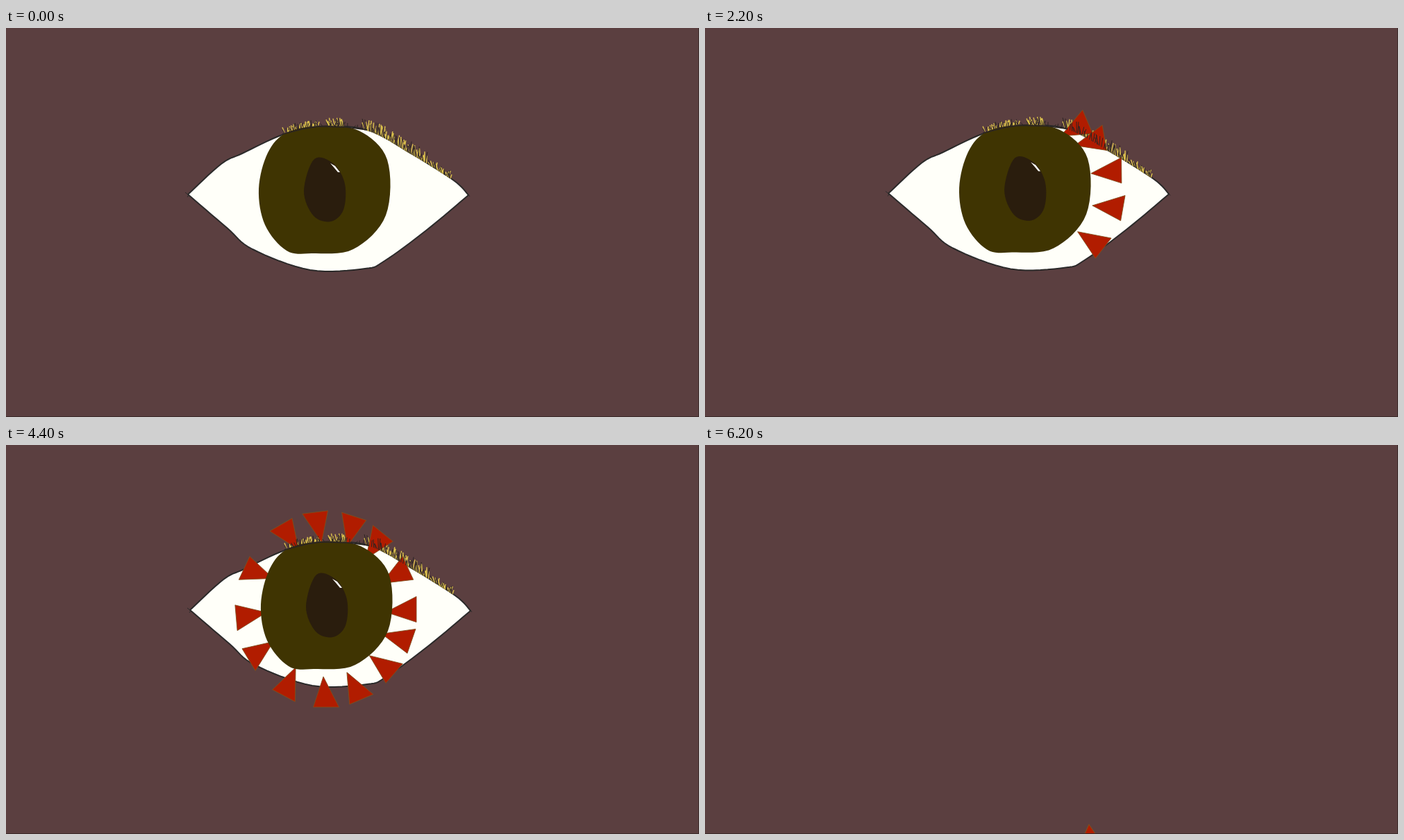
Animation of 998 by 561 pixels, one loop 6.4 s. Source, as an HTML page with a canvas:

```html
<!DOCTYPE html>
<html lang="en">
<head>
<meta charset="utf-8">
<title>Eye</title>
<style>
html, body { margin: 0; width: 100%; height: 100%; overflow: hidden; background: #5b3f40; }
canvas { display: block; }
</style>
</head>
<body>
<canvas id="stage" width="998" height="561"></canvas>
<script>
const ctx = document.getElementById('stage').getContext('2d');
const STEP = 200, COUNT = 32, RAD = Math.PI / 180;
const DARK = '#2b2422', RED = '#b11c00', WHITE = '#fffff9';

// Smooth curve through a few key points, as a dense list of points
function curve(text, closed) {
  const p = text.split(' ').map(s => s.split(',').map(Number));
  const len = p.length, last = closed ? len : len - 1, out = [];
  const get = i => closed ? p[(i + len) % len] : p[Math.max(0, Math.min(len - 1, i))];
  for (let i = 0; i < last; i++) {
    const [a, b, c, d] = [-1, 0, 1, 2].map(k => get(i + k));
    for (let u = 0; u < 1; u += 0.125) {
      out.push([0, 1].map(k => b[k] + u / 2 * (c[k] - a[k]
        + u * (2 * a[k] - 5 * b[k] + 4 * c[k] - d[k] + u * (3 * (b[k] - c[k]) + d[k] - a[k])))));
    }
  }
  if (!closed) out.push(p[len - 1]);
  return out;
}

const eyeTop = curve('262,240 310,196 340,181 398,154 450,142 520,147 585,182 645,220 666,241');
const eyeLow = curve('666,241 605,292 545,336 517,347 438,349 355,319 318,288 262,240');
const iris = curve('404,151 452,141.5 508,148 549,190 547,270 500,319 440,325 404,321 373,284 364,232 377,180', true);
const pupil = curve('444,189 472,196 488,225 486,262 468,279 443,271 429,235', true);
const lidTop = curve('248,251 305,193 375,154 440,132 510,133 605,182 687,250');
const lidLow = curve('687,252 600,330 510,381 438,383 335,335 309,309 248,251');

// Values of a track of [position, ...values] at n
function at(keys, n) {
  const j = keys.findIndex(k => k[0] > n);
  if (j === 0) return keys[0].slice(1);
  if (j < 0) return keys[keys.length - 1].slice(1);
  const a = keys[j - 1], b = keys[j], u = (n - a[0]) / (b[0] - a[0]);
  return a.slice(1).map((v, i) => v + (b[i + 1] - v) * u);
}

// Angles of the spikes round the iris: ten, then a full ring, then turned clockwise
const ten = [-51, -37, -14, 10, 38, 81, 113, 158, 197, 232];
const ring = [-46, -24, 0, 23, 52, 79, 111, 145, 197, 218, 248, 270, 290, 171];
const turned = [-25, 0, 19, 41, 67, 90, 118, 149, 205, 240, 263, 288, 309, 175];
const spikes = ring.map((a, i) => ({
  birth: i < 9 ? 7 + i : 6 + i,
  keys: [[15, ten[i] ?? a], [19, a], [22, turned[i]], [27, turned[i] + 12]]
}));
const drift = [[0, 0, 0], [7, 2.4, -2], [15, 1.8, -1], [19, 1, -1], [22, 3, -2]];

function random(seed) {
  return () => (seed = (seed * 16807) % 2147483647) / 2147483647;
}

function poly(list, fill, stroke, width) {
  ctx.beginPath();
  list.forEach(p => ctx.lineTo(...p));
  ctx.closePath();
  ctx.fillStyle = fill;
  ctx.fill();
  if (stroke) pen(stroke, width);
}

function pen(color, width, path = undefined) {
  ctx.strokeStyle = color;
  ctx.lineWidth = width;
  if (path) ctx.stroke(new Path2D(path));
  else ctx.stroke();
}

function spike(x, y, deg, w = 1, h = 1) {
  ctx.save();
  ctx.translate(x, y);
  ctx.rotate(deg * RAD);
  ctx.scale(h, w);
  poly([[0, -18.5], [44, -4], [0, 18.5]], RED, '#80501c', 0.8);
  ctx.restore();
}

// Spikes sit on an oval that grows taller; the upper ones lie flat at first
function drawSpikes(n) {
  const [rx, ry] = at([[19, 143, 131], [22, 130, 141]], n);
  for (const { birth, keys } of spikes) {
    if (n < birth) continue;
    const [deg] = at(keys, n), sin = Math.sin(deg * RAD), cos = Math.cos(deg * RAD);
    const tilt = sin < 0 ? -5.2 * Math.max(0, 22 - n) * sin * cos : 0;
    spike(461 + rx * cos, 237 + ry * sin, deg + 180 + tilt);
  }
}

// Short hairs on an edge between x0 and x1
function hairs(edge, x0, x1, gap, height, color, seed, width = 1) {
  const rnd = random(seed);
  ctx.beginPath();
  for (let x = x0; x < x1; x += gap * (0.5 + rnd())) {
    const [y] = at(edge, x);
    ctx.moveTo(x, y + 1);
    ctx.lineTo(x + (rnd() - 0.5) * 8, y - height * (0.35 + 0.65 * rnd()));
  }
  pen(color, width);
}

function lashes(color, seed, gap, width) {
  hairs(eyeTop, 402, 450, gap, 10, color, seed, width);
  hairs(eyeTop, 465, 488, gap, 12, color, seed + 97, width);
  hairs(eyeTop, 517, 606, gap, 16, color, seed + 194, width);
  hairs(eyeTop, 612, 640, gap, 10, color, seed + 291, width);
}

function drawEye(n) {
  const [dx, dy] = at(drift, n);
  const shifted = draw => {
    ctx.save();
    ctx.translate(dx, dy);
    draw();
    ctx.restore();
  };
  shifted(() => {
    poly([...eyeTop, ...eyeLow], WHITE, '#2b2a2a', 2);
    pen('#2b2a2a', 1, 'M258 237L263 241L261 244M664 238L668 243');
    lashes('#d8bd4c', 311, 1.8, 1.5);
  });
  drawSpikes(n);
  shifted(() => {
    poly(iris, '#3f3402');
    poly(pupil, '#2a1d0d');
    poly([[467, 195], [474, 199], [481, 208], [478, 208], [473, 202]], WHITE);
    pen(DARK, 1.4, 'M398 153L430 145L450 142L490 143L520 147');
    lashes(DARK, 733, 2.6, 1);
    hairs(eyeTop, 450, 520, 6, 6, DARK, 59);
  });
}

function drawLid(closed) {
  const low = closed ? lidLow : lidLow.map(([x]) => [x, 252]);
  poly([...lidTop, ...low], '#684807', '#75530f', 0.8);
  pen(DARK, 1.2, 'M372 155L405 142L440 132L470 131L515 134L545 145');
  // Folds fanning out of the left corner
  const rnd = random(41);
  for (let i = 0; i < 12; i++) {
    const r = rnd() * 5;
    pen(DARK, 1, `M249 ${250 + r / 3}Q${281 + r} ${211 + r} ${308 + i * 2} ${193 - i + r}T${336 + i * 5} ${178 - i * 2.6 + r}`);
  }
  for (let i = 0; i < 6; i++) {
    const x = 346 - i * 7, y = 219 + i * 5 + rnd() * 4;
    pen(DARK, 0.9, `M250 251Q${x - 40} ${y + 18} ${x} ${y}`);
  }
  pen(DARK, 1, 'M291 240Q340 214 376 206T445 193M303 235Q318 228 342 219M414 199Q445 192 473 193M425 197L447 194');
  hairs(lidTop, 405, 512, 4, 5, DARK, 17);
  const lowEdge = [...low].reverse();
  [['#e0cd80', 83, 1.2], [DARK, 151, 1.1]].forEach(([color, seed, width]) => {
    hairs(lidTop, 530, 612, 3, 11, color, seed, width);
    hairs(lidTop, 622, 644, 3, 7, color, seed + 9, width);
    if (!closed) return;
    for (const x of [606, 645, 675]) hairs(lowEdge, x, x + 13, 2.4, 9, color, seed + x, width);
  });
}

function draw(n) {
  ctx.fillStyle = '#5b3f40';
  ctx.fillRect(0, 0, 998, 561);
  if (n < 29) drawEye(n);
  if (n >= 24 && n < 29) drawLid(n > 24);
  // Loose spikes drop off the stage
  if (n === 26 || n === 27) spike(623, 552 - 145 * (27 - n), 94, 1.24, 0.95);
  if (n >= 28) spike(558, 589 - 145 * (31 - n), 270, 1.27, 0.95);
  ctx.fillStyle = '#3b2b2b';
  ctx.fillRect(0, 560, 998, 1);
  ctx.fillRect(997, 0, 1, 561);
}

ctx.lineJoin = 'round';
const start = performance.now();
function tick() {
  draw(Math.floor((performance.now() - start) / STEP) % COUNT);
  requestAnimationFrame(tick);
}
tick();
</script>
</body>
</html>
```
